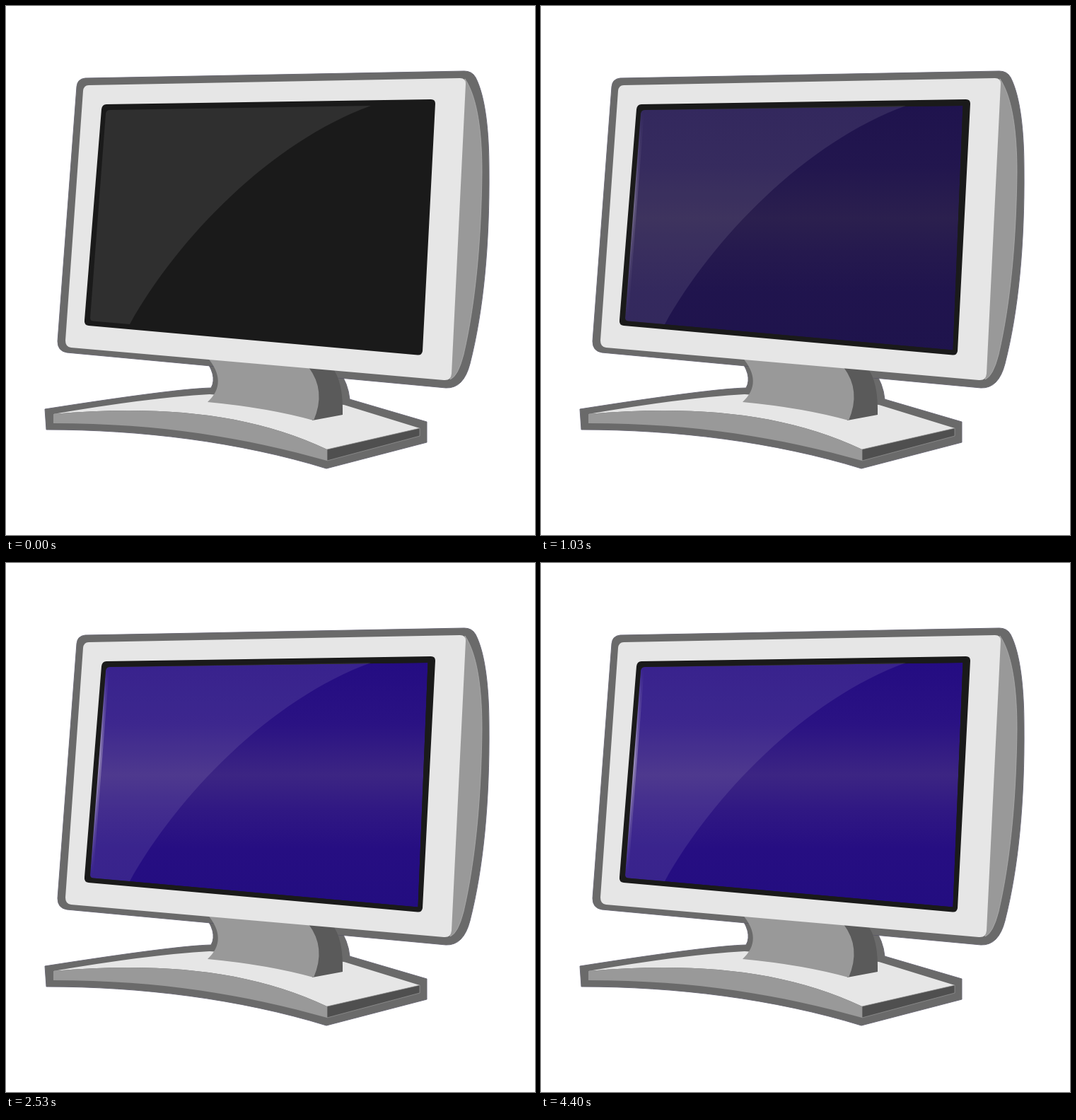
Animation of 748x748 px, one loop 4430 ms. Source, as an HTML page with a canvas:

```html
<!DOCTYPE html>
<html lang="en">
<head>
<meta charset="utf-8">
<title>Monitor switching on</title>
<style>
  html, body { margin: 0; width: 100%; height: 100%; overflow: hidden; background: #fff; }
  canvas { display: block; width: 100vw; height: 100vh; }
</style>
</head>
<body>
<canvas id="stage" width="748" height="748"></canvas>
<script>
const ctx = document.getElementById('stage').getContext('2d');
const LOOP = 4430;
const FADE_START = 765;
const FADE_END = 1300;

const shapes = {
  caseOutline: 'M112 102L648 92Q659 92 664 101C678 128 683 178 683 230C684 338 675 432 656 506Q647 541 622 540L86 490Q73 488 73 474L100 114Q101 103 112 102Z',
  standOutline: 'M278 495Q300 522 290 540Q240 541 55 570L57 599C190 599 330 616 453 654L595 617V588L486 556Q484 534 470 514Z',
  baseTop: 'M67 577Q200 554 288 549L478 564L585 597L454 627C345 575 215 564 67 577Z',
  baseFront: 'M67 577C215 564 345 575 454 627V643C340 611 220 590 67 590Z',
  baseSide: 'M454 627L585 597V608L454 643Z',
  neckSide: 'M427 508L461 511Q477 530 476 578L433 586Z',
  neckFront: 'M284 496Q315 532 285 560Q370 568 435 586Q453 544 428 511Z',
  side: 'M649 103C667 130 673 180 673 235C672 330 664 420 647 493Q639 524 628 528Z',
  front: 'M117 112L642 102Q650 102 650 110L630 520Q629 530 619 529L92 483Q84 482 84 473L109 120Q110 112 117 112Z',
  bezel: 'M142 139L601 132Q607 132 607 138L589 488Q588 494 582 493.5L117 452Q110 451 111 444L135 146Q136 139 142 139Z',
  panel: 'M147 147L596.5 141L582.5 486.5L123 445.5Q119 445 119 441L141 152Q142 147 147 147Z',
  glare: 'M147 147L516 141C375 192 243 328 175 450L123 445.5Q119 445 119 441L141 152Q142 147 147 147Z'
};
const paths = Object.fromEntries(
  Object.entries(shapes).map(([name, d]) => [name, new Path2D(d)]));

function gradient(x0, y0, x1, y1, ...stops) {
  const g = ctx.createLinearGradient(x0, y0, x1, y1);
  stops.forEach(([at, color]) => g.addColorStop(at, color));
  return g;
}

const glow = gradient(0, 141, 0, 487,
  [0, '#240c82'], [0.25, '#2a1283'], [0.46, '#3c2583'],
  [0.6, '#301883'], [0.76, '#260e82'], [1, '#230d80']);
const edgeLight = gradient(0, 150, 0, 440,
  [0, 'rgba(190,180,205,0)'], [0.45, 'rgba(190,180,205,.4)'], [1, 'rgba(190,180,205,0)']);

function fill(name, color) {
  ctx.fillStyle = color;
  ctx.fill(paths[name]);
}

function line(name, color, width) {
  ctx.strokeStyle = color;
  ctx.lineWidth = width;
  ctx.stroke(paths[name]);
}

function drawBody() {
  for (const name of ['standOutline', 'caseOutline']) {
    line(name, '#4c4862', 0.8);
    fill(name, '#6a6a6a');
  }
  fill('baseTop', '#e6e6e6');
  fill('baseFront', '#999');
  fill('baseSide', '#4f4f4f');
  line('baseSide', '#999', 0.7);
  fill('neckSide', '#5a5a5a');
  fill('neckFront', '#999');
  fill('side', '#999');
  line('side', '#b4b4b4', 0.7);
  fill('front', '#e6e6e6');
  fill('bezel', '#1a1a1a');
}

function drawPanel(power) {
  ctx.save();
  ctx.clip(paths.panel);
  ctx.globalAlpha = power;
  fill('panel', glow);
  ctx.strokeStyle = edgeLight;
  ctx.beginPath();
  ctx.moveTo(142, 147);
  ctx.lineTo(119, 446);
  // Stacked widths soften the light along the left edge.
  for (const width of [3, 8]) {
    ctx.lineWidth = width;
    ctx.stroke();
  }
  ctx.restore();
  fill('glare', 'rgba(255,255,255,.09)');
}

function draw(now) {
  const t = now % LOOP;
  const power = Math.min(1, Math.max(0, (t - FADE_START) / (FADE_END - FADE_START)));
  ctx.fillStyle = '#fff';
  ctx.fillRect(0, 0, 748, 748);
  drawBody();
  drawPanel(power);
}

let start;
function tick(now) {
  start ??= now;
  draw(now - start);
  requestAnimationFrame(tick);
}
draw(0);
requestAnimationFrame(tick);
</script>
</body>
</html>
```
